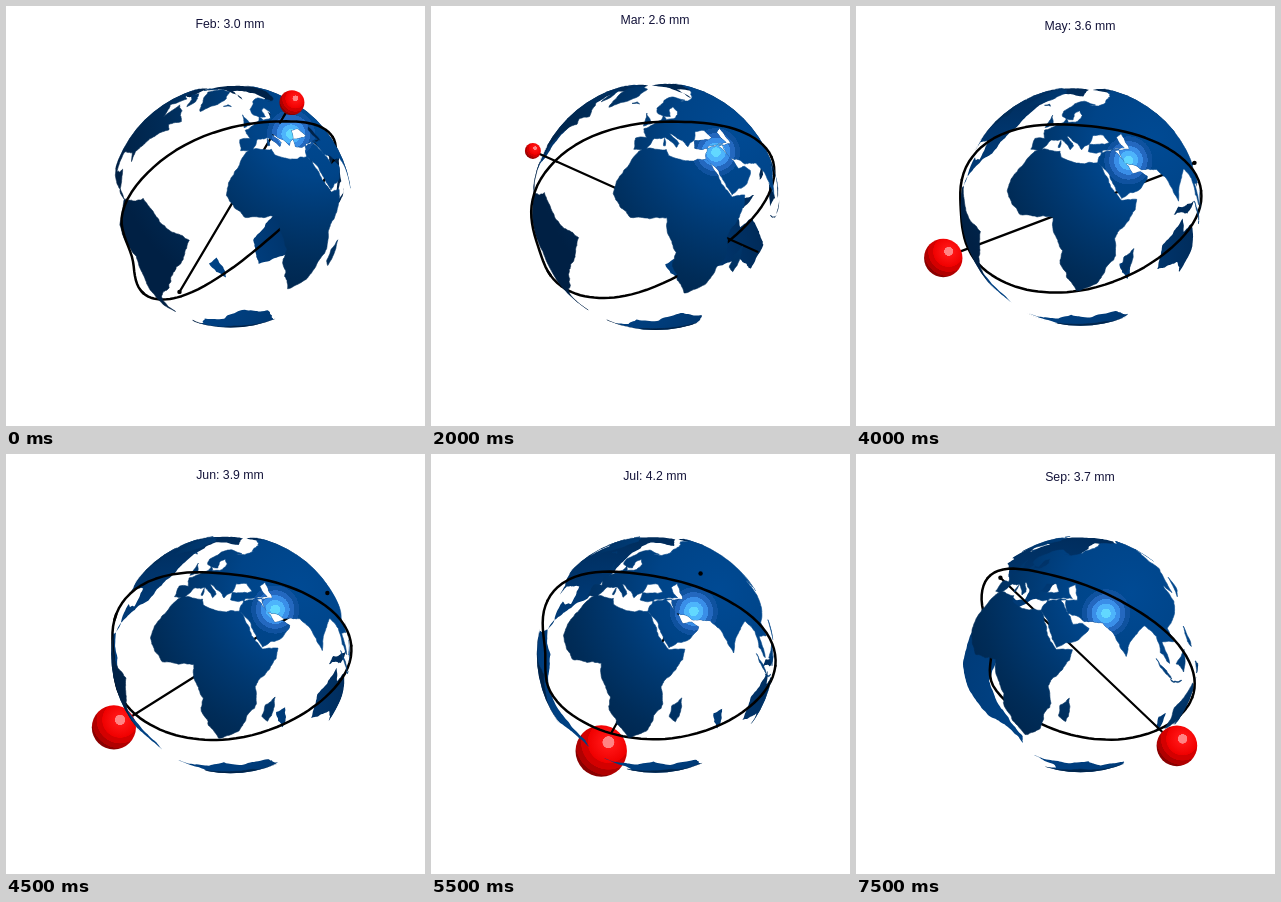
An HTML page that plays this animation: 419x420 px, repeating every 8 s.

```html
<!DOCTYPE html>
<html lang="en">
<head>
<meta charset="utf-8">
<title>Globe</title>
<style>
html, body { margin: 0; width: 100%; height: 100%; overflow: hidden; background: #fff; }
svg { display: block; }
text { font: 12.3px "Liberation Sans", Arial, sans-serif; fill: #14143a; text-anchor: middle; }
.line { fill: none; stroke: #000; stroke-linejoin: round; stroke-linecap: round; }
</style>
</head>
<body>
<svg width="419" height="420" viewBox="0 0 419 420">
  <defs>
    <radialGradient id="lit" gradientUnits="userSpaceOnUse" r="210">
      <stop offset="0" stop-color="#004a94"/><stop offset=".3" stop-color="#004488"/>
      <stop offset=".5" stop-color="#003870"/><stop offset=".72" stop-color="#002c58"/>
      <stop offset="1" stop-color="#002044"/>
    </radialGradient>
    <radialGradient id="inner" gradientUnits="userSpaceOnUse" r="220">
      <stop offset="0" stop-color="#00478e"/><stop offset=".42" stop-color="#003c7a"/>
      <stop offset="1" stop-color="#001f42"/>
    </radialGradient>
    <radialGradient id="glow" gradientUnits="userSpaceOnUse" r="24"></radialGradient>
    <radialGradient id="red" cx=".64" cy=".33" r=".8">
      <stop offset=".14" stop-color="#ff8484"/><stop offset=".15" stop-color="#ff1414"/>
      <stop offset=".5" stop-color="#f00000"/><stop offset=".51" stop-color="#d40000"/>
      <stop offset=".66" stop-color="#d40000"/><stop offset=".67" stop-color="#b00000"/>
      <stop offset=".8" stop-color="#b00000"/><stop offset=".81" stop-color="#8a0000"/>
    </radialGradient>
    <clipPath id="disc"><circle id="limb"/></clipPath>
    <path id="nearLand"/>
  </defs>
  <text id="title" x="224"></text>
  <g id="behind"></g>
  <path id="farLand" fill="url(#inner)" clip-path="url(#disc)"/>
  <path id="farTrack" class="line" stroke-width="2.5"/>
  <path id="axis" class="line" stroke-width="2.2"/>
  <g clip-path="url(#disc)">
    <use href="#nearLand" fill="url(#lit)" stroke="url(#lit)" stroke-width=".6"/>
    <use href="#nearLand" fill="url(#glow)"/>
  </g>
  <path id="nearTrack" class="line" stroke-width="2.5"/>
  <g id="before"></g>
  <circle id="tip" r="2.2"/>
  <g id="pin"><path id="stem" class="line" stroke-width="2.2"/><circle id="ball" fill="url(#red)"/></g>
</svg>
<script>
const $ = id => document.getElementById(id);
const set = (id, attrs) => { for (const k in attrs) $(id).setAttribute(k, attrs[k]); };

// Highlight in flat rings, brightest in the middle
$('glow').innerHTML = ['#62d8ff', '#4db4fb', '#3a8ee8', '#2468bf', '#0f529f'].map((color, i) =>
  [i, i + 1].map(k => `<stop offset="${k / 5}" stop-color="${color}"/>`).join('')).join('') +
  '<stop offset="1" stop-color="#0f529f" stop-opacity="0"/>';

// Key longitude,latitude points of each land; the coast between them is roughened
const coasts = {
  africa: '-6,36 10,37 11,34 20,31 32,31 37,21 43,12 51,12 46,2 39,-6 40,-15 35,-24 30,-31 20,-35 15,-27 12,-17 13.5,-12 9,-1 9,4.5 -8,4.5 -17,15 -16,21 -10,30',
  arabia: '32,31 35,28 43,13 52,16 59.5,22.5 56,25 51,24.5 48,30 46,37.5 36,37.5',
  europe: '-9,37 -9,43 -2,43.5 -4.5,48.4 2,51 8.5,54 10.5,57.5 12,54 20,55 24,59 64,61 64,50 47,44 50,38 36,36.3 27,37 28,41 41,41.5 38,46 31,46 28,41.2 23,38 19,42 13,45.5 18,40 16,38 10,43.5 3,43 -2,37',
  scandinavia: '24,59 21,63 25,65.5 17,61 16,56 13,56 6,58 5,62 15,68.5 28,71 41,67 34,66.5 44,66 62,69 62,59',
  northAsia: '58,69 80,73 104,77 140,72 180,69 188,66 163,58 156,51 163,61 142,59 136,54 140,48 128,40 126,35 121,40 90,45 58,45',
  southAsia: '121,40 122,31 110,21 106,19 109,12 100,13 104,2 98,8 97,16 91,22 82,16 78,8 73,18 71,21 67,25 57,26 48,30 43,37 53,37 52,47 90,50 121,50',
  northAmerica: '-168,66 -128,70 -95,68 -82,67 -94,60 -82,55 -79,52 -78,62 -66,59 -56,52 -66,49 -62,46 -70,42 -76,36 -81,31 -80,26 -84,30 -97,28 -95,18.5 -87,21 -83,11 -77,8 -92,15 -106,20 -118,34 -124,45 -139,60 -160,56',
  southAmerica: '-77,8 -62,10.5 -50,0 -35,-7 -39,-17 -48,-27 -57,-37 -65,-42 -69,-51 -67,-55 -74,-51 -73,-38 -70,-19 -81,-5',
  antarctica: '-180,-78 -140,-75 -75,-72 -60,-64 -62,-75 -40,-78 -10,-71 55,-67 115,-66.5 150,-68.5 170,-74',
  greenland: '-45,60 -54,69 -70,77 -45,83 -18,80 -24,70',
  baffin: '-65,62 -73,68 -88,71 -80,73.5 -62,67',
  ellesmere: '-90,77 -63,82 -95,80',
  iceland: '-23,65 -14,65 -18,66.5',
  britain: '-5,50 1.5,52 -4,58.5',
  sardinia: '8.5,39 9.5,43 9.5,39',
  madagascar: '49.5,-12 47,-25 43.5,-22 44.5,-16',
  australia: '114,-22 131,-12 138,-17 142,-11 153,-26 148,-38 131,-31.5 115,-34.5',
  newGuinea: '131,-1 147,-6 150,-10.5 138,-8',
  newZealand: '173,-35 178,-38 168,-46',
  borneo: '109,1 117,7 116,-4',
  sumatra: '95,5.5 106,-6 101,-2.5',
  java: '105,-6 115,-8 108,-8',
  philippines: '121,18 126,7 122,10',
  japan: '130,32 141,42 140,35.5'
};

const rad = Math.PI / 180, cx = 224.5, cy = 200;
const sinTilt = Math.sin(10 * rad), cosTilt = Math.cos(10 * rad);

// Earth axes: x towards 90E, y towards the north pole, z towards 0E
const polar = (lon, lat, r = 1) => [
  r * Math.cos(lat * rad) * Math.sin(lon * rad), r * Math.sin(lat * rad),
  r * Math.cos(lat * rad) * Math.cos(lon * rad)];
const unit = v => v.map(c => c / Math.hypot(...v));
function toView([x, y, z], turn) {
  const depth = x * Math.sin(turn) + z * Math.cos(turn);
  return [x * Math.cos(turn) - z * Math.sin(turn),
    y * cosTilt - depth * sinTilt, y * sinTilt + depth * cosTilt];
}

let seed = 7;
const random = () => (seed = seed * 16807 % 2147483647) / 2147483647;

// Midpoint displacement along one stretch of coast
function roughen(a, b) {
  const gap = Math.hypot(...a.map((v, k) => v - b[k]));
  if (gap < .025) return [a];
  const mid = unit(a.map((v, k) => (v + b[k]) / 2 + (random() - .5) * .2 * Math.min(gap, .2)));
  return [...roughen(a, mid), ...roughen(mid, b)];
}
const lands = Object.values(coasts).map(coast => {
  const ring = coast.split(' ').map(s => polar(...s.split(',').map(Number)));
  return ring.flatMap((p, i) => roughen(p, ring[(i + 1) % ring.length]));
});

// Closed yearly orbit through key points: step, longitude, latitude, millimetres
const year = 25.5;
const orbit = [
  [0, 25.7, 51.3, 3], [4, -58.7, 25.9, 2.6], [6, -77, -1, 3.1], [8, -73.4, -21.8, 3.6],
  [10, -94.7, -43, 4.1], [13, -146.4, -55, 4.3], [15, 169.7, -43.6, 3.7],
  [17.5, 143.5, -23.5, 3.1], [20, 114, 7, 2.9], [22.5, 79, 35.6, 3]
].map(([step, ...place]) => ({ step, v: polar(...place) }));
const knot = i => {
  const n = orbit.length, lap = Math.floor(i / n), k = orbit[i - lap * n];
  return { step: k.step + lap * year, v: k.v };
};
function motion(step) {
  const i = orbit.findLastIndex(k => k.step <= step);
  const [p, a, b, q] = [i - 1, i, i + 1, i + 2].map(knot);
  const h = b.step - a.step, u = (step - a.step) / h;
  return a.v.map((from, c) => {
    const slopeA = (b.v[c] - p.v[c]) / (b.step - p.step);
    const slopeB = (q.v[c] - from) / (q.step - a.step);
    return from + (b.v[c] - from) * u * u * (3 - 2 * u) +
      h * u * (1 - u) * (slopeA * (1 - u) - slopeB * u);
  });
}
const track = Array.from({ length: 103 }, (_, i) => unit(motion(i % 102 / 4)));

const pt = (x, y) => x.toFixed(1) + ' ' + y.toFixed(1);

// Points past the limb unfold outside the disc, where the clip hides them
function landPath(turn, R, side) {
  return lands.map(ring => {
    const view = ring.map(p => toView(p, turn));
    if (view.every(p => p[2] * side < 0)) return '';
    return 'M' + view.map(([x, y, z]) => {
      const rho = Math.hypot(x, y) || .001;
      const k = z * side < 0 ? R * (2 - rho) / rho : R;
      return pt(cx + x * k, cy - y * k);
    }).join('L') + 'Z';
  }).join('');
}
function trackPath(turn, R, side) {
  let d = '', pen = false;
  for (const p of track) {
    const [x, y, z] = toView(p, turn), seen = z * side >= -.04;
    if (seen) d += (pen ? 'L' : 'M') + pt(cx + x * R, cy - y * R);
    pen = seen;
  }
  return d;
}

function draw(step) {
  const place = motion(step), mm = Math.hypot(...place);
  const turn = (-15 + step * 14 / 3) * rad;
  const titleY = 23.5 - 10.5 / (1 + ((step - 3) / 3.3) ** 2);
  const R = (cy - titleY) / 1.5;
  const [x, y, z] = toView(unit(place), turn);
  const along = k => pt(cx + x * R * k, cy - y * R * k);
  const lx = Math.min(285, 298 - 3.2 * step), ly = 161 - 33 * Math.exp(-step / 5);
  const date = new Date(Date.UTC(2001, 1, 1) + step * 14.3 * 864e5);
  const month = date.toLocaleString('en-US', { month: 'short', timeZone: 'UTC' });

  $('title').textContent = `${month}: ${mm.toFixed(1)} mm`;
  set('title', { y: titleY + 4 });
  set('limb', { cx, cy, r: R });
  set('glow', { cx: lx, cy: ly });
  set('lit', { cx: lx + 25, cy: ly - 20 });
  set('inner', { cx: 2 * cx - lx, cy: 2 * cy - ly });
  for (const [name, side] of [['near', 1], ['far', -1]]) {
    set(name + 'Land', { d: landPath(turn, R, side) });
    set(name + 'Track', { d: trackPath(turn, R * 1.015, side) });
  }
  set('axis', { d: `M${along(1)}L${along(-1.03)}` });
  set('stem', { d: `M${along(1)}L${along(1.24)}` });
  set('ball', { cx: cx + x * R * 1.24, cy: cy - y * R * 1.24, r: 8 + (mm - 2.6) * 11.2 });
  set('tip', { cx: cx - x * R * 1.03, cy: cy + y * R * 1.03 });
  const [pinLayer, tipLayer] = z < 0 ? ['behind', 'before'] : ['before', 'behind'];
  $(pinLayer).append($('pin'));
  $(tipLayer).append($('tip'));
}

const start = performance.now();
let shown = -1;
function tick() {
  const step = Math.floor((performance.now() - start) % 8000 / 500);
  if (step !== shown) draw(shown = step);
  requestAnimationFrame(tick);
}
tick();
</script>
</body>
</html>
```
